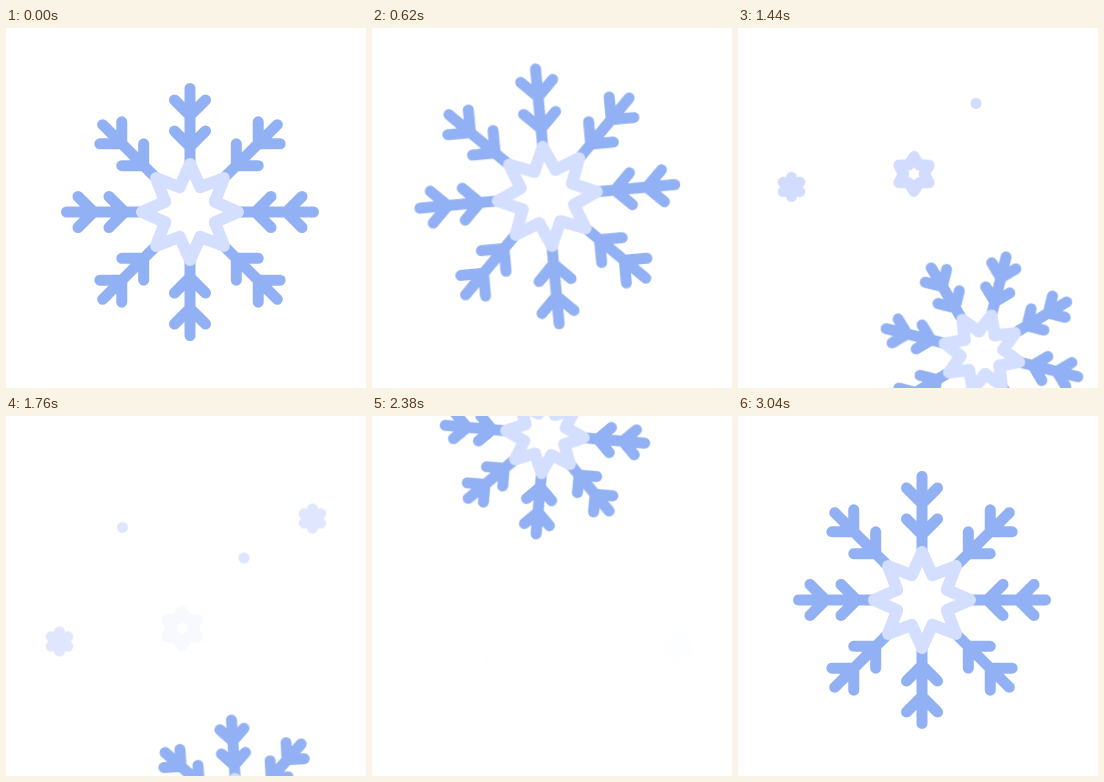
An HTML page without scripts for the animation above (3.1 s loop, 360 by 360 pixels).

```html
<!DOCTYPE html>
<html lang="en">
<head>
<meta charset="utf-8">
<title>Snowflake</title>
<style>
html, body { margin: 0; width: 100%; height: 100%; overflow: hidden; background: #fff; }
svg { display: block; width: 100vw; height: 100vh; }
path { fill: none; stroke-linecap: round; stroke-linejoin: round; vector-effect: non-scaling-stroke; }
.arm { stroke: #92b1f4; stroke-width: 11px; }
.point { stroke: #d4deff; stroke-width: 12px; }
.petal, .lobe { stroke: #d2dcfe; stroke-width: 11px; }
.dot { fill: #d2dcfe; }

.x, .y, .spin, .size, .fall { animation: 3.1s linear infinite; }
.x { animation-name: x; }
.y { animation-name: y; }
.spin { animation-name: spin; }
.size { animation-name: size; }
.fall { animation-name: fall; }
.long, .short { animation: long 3.1s linear infinite; animation-delay: calc(var(--at) - 3.1s); }
.short { animation-name: short; }

@keyframes x {
  0% { transform: translateX(184px); }
  3.87% { transform: translateX(184px); animation-timing-function: cubic-bezier(.4,.2,.7,1); }
  22.26% { transform: translateX(175px); animation-timing-function: cubic-bezier(.45,0,.7,.75); }
  32.9% { transform: translateX(220.5px); animation-timing-function: cubic-bezier(.3,.6,.6,1); }
  46.45% { transform: translateX(244px); animation-timing-function: cubic-bezier(.4,0,.75,.64); }
  56.77% { transform: translateX(231.5px); }
  65.48% { transform: translateX(213px); }
  76.77% { transform: translateX(173px); animation-timing-function: ease-out; }
  83.87% { transform: translateX(170.5px); animation-timing-function: ease-in; }
  90.32% { transform: translateX(174px); }
  98.06%, 100% { transform: translateX(184px); }
}
@keyframes y {
  0% { transform: translateY(184px); }
  3.87% { transform: translateY(184px); animation-timing-function: cubic-bezier(.4,.2,.7,1); }
  22.26% { transform: translateY(167.8px); animation-timing-function: cubic-bezier(.45,0,.75,.645); }
  32.9% { transform: translateY(223.5px); }
  46.45% { transform: translateY(324.5px); }
  56.77% { transform: translateY(400px); }
  65.48% { transform: translateY(463px); }
  65.49% { transform: translateY(-105px); }
  76.77% { transform: translateY(18px); }
  90.65% { transform: translateY(131px); }
  98.06%, 100% { transform: translateY(184px); }
}
@keyframes spin {
  0% { transform: rotate(0deg); }
  3.87% { transform: rotate(0deg); animation-timing-function: ease-in-out; }
  20.65% { transform: rotate(-5.3deg); animation-timing-function: cubic-bezier(.45,0,.75,.675); }
  32.9% { transform: rotate(21deg); }
  46.45% { transform: rotate(59deg); }
  56.77% { transform: rotate(86.3deg); }
  76.77% { transform: rotate(140deg); animation-timing-function: cubic-bezier(.3,.42,.6,1); }
  98.06%, 100% { transform: rotate(180deg); }
}
@keyframes size {
  0% { transform: scale(1); }
  3.87% { transform: scale(1); animation-timing-function: cubic-bezier(.4,.2,.7,1); }
  22.26% { transform: scale(1.038); animation-timing-function: ease-in-out; }
  32.9% { transform: scale(.815); }
  46.45% { transform: scale(.8); }
  56.77% { transform: scale(.78); }
  76.77% { transform: scale(.81); }
  90.65% { transform: scale(.95); }
  98.06%, 100% { transform: scale(1); }
}
@keyframes fall {
  from { transform: translateY(0); }
  to { transform: translateY(645px); }
}
@keyframes long {
  0%, 29.03%, 100% { opacity: 0; }
  9.03%, 21.94% { opacity: 1; }
}
@keyframes short {
  0%, 23.87%, 100% { opacity: 0; }
  4.84%, 13.7% { opacity: 1; }
}
</style>
</head>
<body>
<svg viewBox="0 0 360 360">
  <defs>
    <path id="arm" class="arm" d="M0-40V-123.5M-15.5-112 0-96.5 15.5-112M-15.5-81 0-65.5 15.5-81"/>
    <path id="point" class="point" d="M-10.3-24.9 0-48 10.3-24.9"/>
    <path id="petal" class="petal" d="M-5.2-9 0-17.5 5.2-9"/>
    <path id="lobe" class="lobe" d="M0 0V-9.5"/>
    <g id="arms2"><use href="#arm"/><use href="#arm" transform="rotate(45)"/></g>
    <g id="arms4"><use href="#arms2"/><use href="#arms2" transform="rotate(90)"/></g>
    <g id="points2"><use href="#point"/><use href="#point" transform="rotate(45)"/></g>
    <g id="points4"><use href="#points2"/><use href="#points2" transform="rotate(90)"/></g>
    <g id="ring3"><use href="#petal"/><use href="#petal" transform="rotate(60)"/><use href="#petal" transform="rotate(120)"/></g>
    <g id="ring"><use href="#ring3"/><use href="#ring3" transform="rotate(180)"/></g>
    <g id="bud3"><use href="#lobe"/><use href="#lobe" transform="rotate(60)"/><use href="#lobe" transform="rotate(120)"/></g>
    <g id="bud"><use href="#bud3"/><use href="#bud3" transform="rotate(180)"/></g>
    <circle id="dot" class="dot" r="5.5"/>
  </defs>

  <g class="fall">
    <g class="long" style="--at:.9s"><use href="#ring" x="176" y="-154"/></g>
    <g class="long" style="--at:1.014s"><use href="#bud" x="53.5" y="-141"/></g>
    <g class="short" style="--at:1.25s"><use href="#dot" x="238" y="-224.5"/></g>
    <g class="short" style="--at:1.65s"><use href="#dot" x="116.5" y="-255"/></g>
    <g class="short" style="--at:1.655s"><use href="#bud" x="306.5" y="-264"/></g>
  </g>

  <g class="x"><g class="y"><g class="spin"><g class="size">
    <use href="#arms4"/><use href="#arms4" transform="rotate(180)"/>
    <use href="#points4"/><use href="#points4" transform="rotate(180)"/>
  </g></g></g></g>
</svg>
</body>
</html>
```
